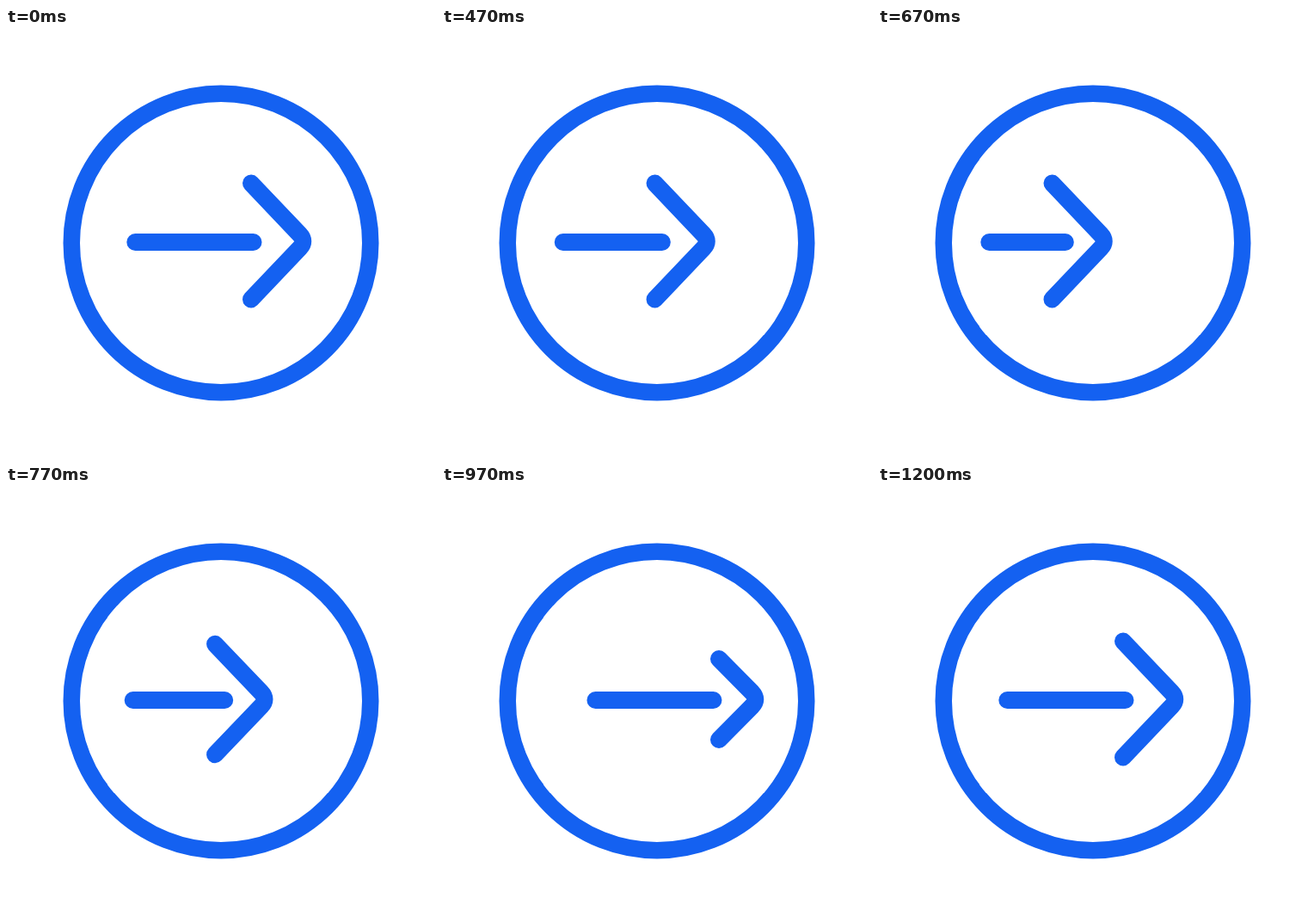
An HTML page that plays this animation: 500 px wide and 500 px high, repeating every 1270 ms.

```html
<!DOCTYPE html>
<html lang="en">
<head>
<meta charset="utf-8">
<title>Arrow button</title>
<style>
html, body { margin: 0; height: 100%; overflow: hidden; background: #fff; }
svg { display: block; width: 100%; height: 100%; }
</style>
</head>
<body>
<svg viewBox="0 0 500 500" fill="none" stroke="#1461f1" stroke-width="20" stroke-linecap="round">
  <circle cx="250" cy="250" r="173.75" stroke-width="19.5"/>
  <path id="shaft"/>
  <path id="head"/>
</svg>
<script>
const LOOP = 1270;
const shaft = document.getElementById('shaft');
const head = document.getElementById('head');

// cubic-bezier(.58, 0, .19, 1), solved by bisection
function ease(x) {
  let lo = 0, hi = 1, s = x;
  for (let i = 0; i < 30; i++) {
    s = (lo + hi) / 2;
    const r = 1 - s;
    if (1.74 * s * r * r + 0.57 * s * s * r + s * s * s < x) lo = s;
    else hi = s;
  }
  return s * s * (3 - 2 * s);
}

// Eased value at frame k, from [frame, value] keys
function track(k, keys) {
  let [k0, v0] = keys[0];
  for (const [k1, v1] of keys) {
    if (k < k1) return k <= k0 ? v0 : v0 + (v1 - v0) * ease((k - k0) / (k1 - k0));
    [k0, v0] = [k1, v1];
  }
  return v0;
}

const move = (k, rest, back, peak) =>
  track(k, [[10, rest], [20, back], [28, peak], [36, rest]]);

function draw(now) {
  // 30 frames per second, held in steps of 10 ms
  const k = Math.floor((Math.floor(now % LOOP / 10) + 0.5) * 0.3);
  const left = move(k, 150.3, 129.3, 179);
  const right = move(k, 287.5, 217.8, 316);
  const shift = move(k, 0, -82.5, 19.4);
  const trim = track(k, [[21, 0], [28, 1], [36, 0]]);
  const x = 285 + shift + 18.3 * trim;
  const h = 67.4 - 20.8 * trim;
  const bend = 341.5 + shift;
  shaft.setAttribute('d', `M${left} 249H${right}`);
  head.setAttribute('d',
    `M${x} ${248 - h}L${bend} 240Q${bend + 7.5} 248 ${bend} 256L${x} ${248 + h}`);
}

const start = performance.now();
function tick() {
  draw(performance.now() - start);
  requestAnimationFrame(tick);
}
tick();
</script>
</body>
</html>
```
